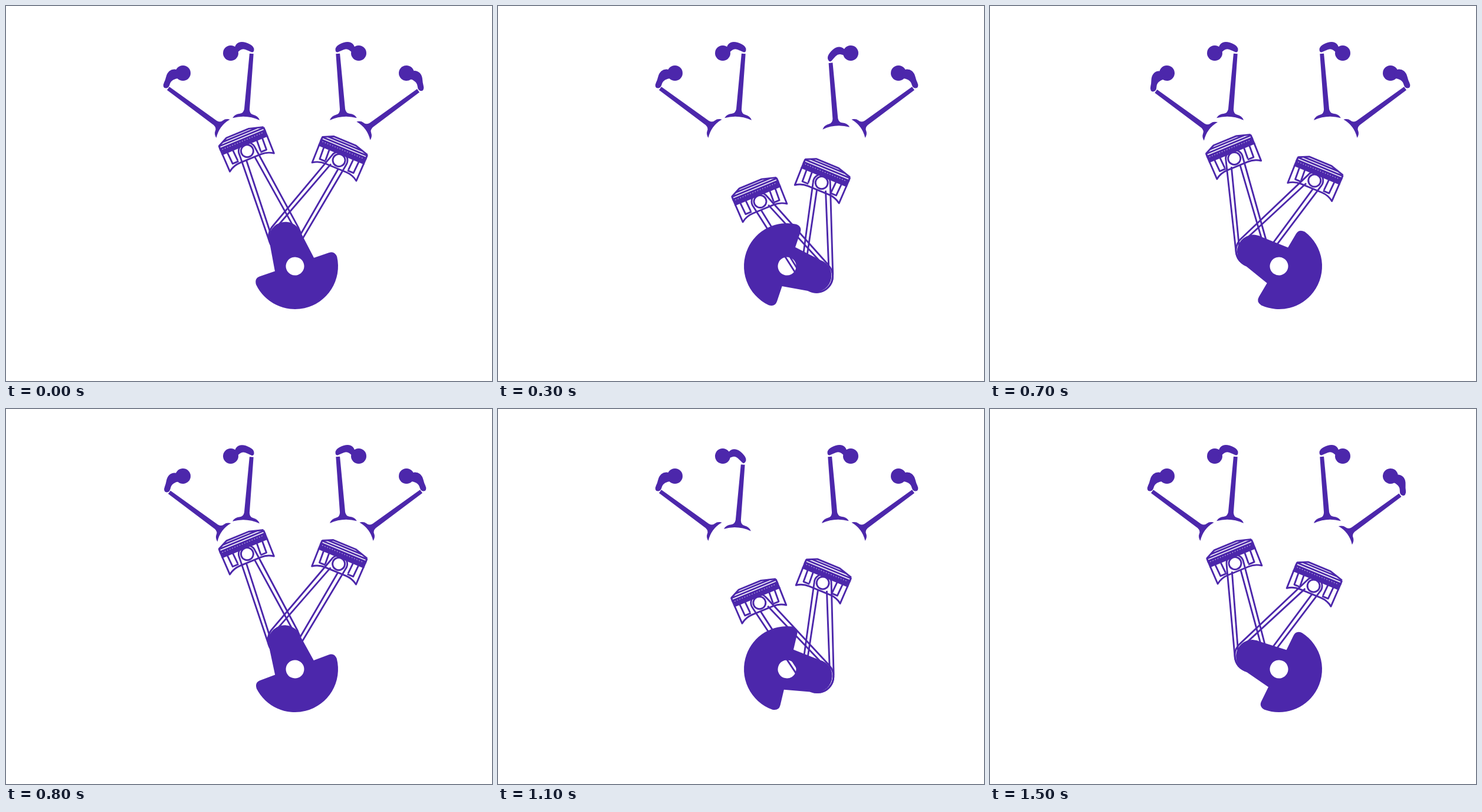
An HTML page with a canvas that plays this animation: 824 px wide and 637 px high, repeating every 1600 ms.

```html
<!DOCTYPE html>
<html lang="en">
<head>
<meta charset="utf-8">
<title>V-twin engine</title>
<style>
  html, body { margin: 0; width: 100%; height: 100%; overflow: hidden; background: #fff; }
  canvas { display: block; }
</style>
</head>
<body>
<canvas id="stage" width="824" height="637"></canvas>
<script>
const ctx = document.getElementById('stage').getContext('2d');
const INK = '#4c27ab';
const CENTER = { x: 490, y: 442 };
const THROW = 53, ROD = 159, BANK = 22.5 * Math.PI / 180;
const STEP = 100, STEPS = 16;

// Crank angle in degrees, clockwise from straight up, at chosen steps of the cycle.
const CRANK_KEYS = [[0, -19], [2, 62], [5, 202], [7, 300.5], [10, 417.5], [13, 555], [15, 656], [16, 701]];

const ROCKERS = {
  outer: [[-8, -6], [-19, -7], [-27, 0], [-30, 12], [-34, 20], [-32, 26], [-24, 25], [-21, 14], [-12, 9], [-5, 9]],
  inner: [[6, -11], [13, -19], [25, -19], [40, -11], [39, 0], [30, -4], [20, -8], [12, -2], [6, 4]]
};

const VALVES = [
  { kind: 'outer', mirror: false, peak: 5.95 },
  { kind: 'inner', mirror: false, peak: 10.3 },
  { kind: 'inner', mirror: true, peak: 3.3 },
  { kind: 'outer', mirror: true, peak: 14.65 }
];

const TRAINS = {
  outer: { ball: [300, 114], stem: [275, 140], tilt: -0.937, length: 110, half: 19.5, swing: -1, lift: 11, span: 2.95 },
  inner: { ball: [381, 80], stem: [416.3, 81], tilt: 0.083, length: 106, half: 23, swing: 1, lift: 16.2, span: 2.6 }
};

function crankAngle(step) {
  const i = CRANK_KEYS.findIndex(key => key[0] > step);
  const [s0, a0] = CRANK_KEYS[i - 1], [s1, a1] = CRANK_KEYS[i];
  return (a0 + (a1 - a0) * (step - s0) / (s1 - s0)) * Math.PI / 180;
}

function liftAt(step, peak, { span, lift }) {
  let d = Math.abs(step - peak);
  d = Math.min(d, STEPS - d);
  return d < span ? lift * Math.cos(Math.PI / 2 * d / span) ** 2 : 0;
}

function placed(x, y, angle, draw) {
  ctx.save();
  ctx.translate(x, y);
  ctx.rotate(angle);
  draw();
  ctx.restore();
}

function polyline(...points) {
  ctx.beginPath();
  points.forEach(([x, y]) => ctx.lineTo(x, y));
  ctx.stroke();
}

function disc(x, y, r) {
  ctx.beginPath();
  ctx.arc(x, y, r, 0, 2 * Math.PI);
  ctx.fill();
}

function blob(points) {
  const mid = (p, q) => [(p[0] + q[0]) / 2, (p[1] + q[1]) / 2];
  ctx.beginPath();
  ctx.moveTo(...mid(points[points.length - 1], points[0]));
  points.forEach((p, i) => ctx.quadraticCurveTo(...p, ...mid(p, points[(i + 1) % points.length])));
  ctx.fill();
}

function drawValve({ kind, mirror, peak }, step) {
  const train = TRAINS[kind];
  const { ball, stem, tilt, length, half, swing } = train;
  const lift = liftAt(step, peak, train);
  ctx.save();
  if (mirror) {
    ctx.translate(979, 0);
    ctx.scale(-1, 1);
  }
  placed(...ball, swing * lift / 36, () => {
    disc(0, 0, 13);
    blob(ROCKERS[kind]);
  });
  placed(...stem, tilt, () => {
    ctx.translate(0, lift);
    ctx.beginPath();
    ctx.moveTo(-3.4, 0);
    ctx.lineTo(3.4, 0);
    ctx.lineTo(4.5, length - 11);
    ctx.quadraticCurveTo(5.5, length - 4, 11, length - 3);
    ctx.quadraticCurveTo(half - 3, length - 1.5, half, length + 5.5);
    ctx.quadraticCurveTo(0, length - 3, -half, length + 5.5);
    ctx.quadraticCurveTo(3 - half, length - 1.5, -11, length - 3);
    ctx.quadraticCurveTo(-5.5, length - 4, -4.5, length - 11);
    ctx.fill();
  });
  ctx.restore();
}

function drawRod(from, to) {
  const angle = Math.atan2(from.x - to.x, to.y - from.y);
  placed(from.x, from.y, angle, () => {
    ctx.beginPath();
    ctx.arc(0, 0, 14.5, Math.PI, 0);
    ctx.lineTo(27.3, ROD - 5);
    ctx.arc(0, ROD, 27.3, -0.1, Math.PI + 0.1);
    ctx.closePath();
    ctx.stroke();
    polyline([-7.5, 13], [-20.5, ROD - 8]);
    polyline([7.5, 13], [20.5, ROD - 8]);
  });
}

function drawPiston(pin, angle) {
  placed(pin.x, pin.y, angle, () => {
    polyline([-41, -26], [-24, -34], [17, -34], [41, -27]);
    polyline([-32, -30], [30, -30]);
    polyline([-42, -25.5], [42, -25.5]);
    ctx.fillRect(-42.5, -22.5, 85, 13);
    ctx.fillRect(-42.5, -26, 3, 8);
    ctx.fillRect(39.5, -26, 3, 8);

    ctx.save();
    ctx.strokeStyle = '#fff';
    ctx.lineWidth = 0.8;
    ctx.setLineDash([1.5, 3]);
    polyline([-38, -18.5], [38, -18.5]);
    ctx.restore();

    ctx.beginPath();
    ctx.moveTo(-41, -11);
    ctx.lineTo(-40.5, 21);
    ctx.quadraticCurveTo(-31, 14, -19, 14);
    ctx.lineTo(19, 14);
    ctx.quadraticCurveTo(31, 14, 40.5, 21);
    ctx.lineTo(41, -11);
    ctx.stroke();
    for (const side of [-1, 1]) {
      polyline([side * 32, -10], [side * 31, 10.5], [side * 20, 10.5]);
      polyline([side * 22, -10], [side * 21, 9]);
    }

    ctx.save();
    ctx.fillStyle = '#fff';
    disc(0, 0, 10.5);
    ctx.stroke();
    ctx.restore();
  });
}

function drawCrank(angle) {
  placed(CENTER.x, CENTER.y, angle, () => {
    ctx.beginPath();
    ctx.moveTo(-35, -3);
    ctx.lineTo(-28, -50);
    ctx.arc(0, -50, 28, Math.PI, 0);
    ctx.lineTo(35, -3);
    ctx.lineTo(62, -3);
    ctx.quadraticCurveTo(72, -3, 72.6, 8);
    ctx.arc(0, 0, 73, 0.11, Math.PI - 0.11);
    ctx.quadraticCurveTo(-72, -3, -62, -3);
    ctx.closePath();
    ctx.moveTo(15.5, 0);
    ctx.arc(0, 0, 15.5, 0, 2 * Math.PI);
    ctx.fill('evenodd');
  });
}

function polar(angle, radius) {
  return { x: CENTER.x + Math.sin(angle) * radius, y: CENTER.y - Math.cos(angle) * radius };
}

function render(step) {
  ctx.fillStyle = '#fff';
  ctx.fillRect(0, 0, 824, 637);
  ctx.fillStyle = ctx.strokeStyle = INK;
  ctx.lineWidth = 2.9;
  ctx.lineJoin = 'round';

  VALVES.forEach(valve => drawValve(valve, step));

  const angle = crankAngle(step);
  const crankPin = polar(angle, THROW);
  for (const bank of [-BANK, BANK]) {
    const turn = angle - bank;
    const reach = THROW * Math.cos(turn) + Math.sqrt(ROD ** 2 - (THROW * Math.sin(turn)) ** 2);
    const pistonPin = polar(bank, reach);
    drawRod(pistonPin, crankPin);
    drawPiston(pistonPin, bank);
  }
  drawCrank(angle);
}

function tick() {
  render(Math.floor(performance.now() / STEP) % STEPS);
  requestAnimationFrame(tick);
}
tick();
</script>
</body>
</html>
```
